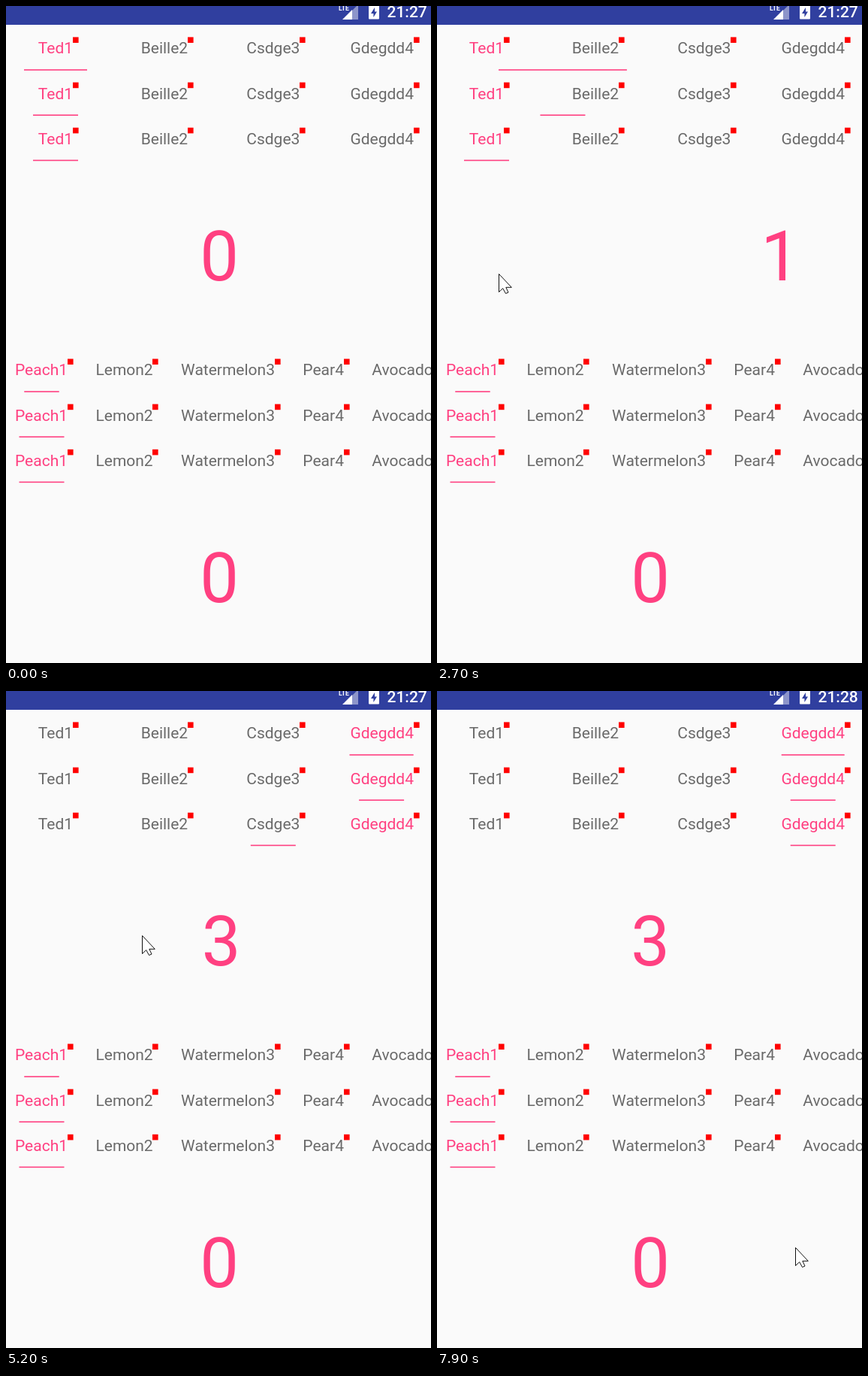
Write an HTML page that moves like this. It is 566 px wide and 874 px high and loops after 8 s.

```html
<!DOCTYPE html>
<html lang="en">
<head>
<meta charset="utf-8">
<title>Sliding tabs</title>
<style>
  html, body { margin: 0; width: 100%; height: 100%; overflow: hidden; background: #fafafa; }
  svg { display: block; width: 566px; height: 874px; font-family: Roboto, sans-serif; }
  .tab { font-size: 21px; fill: #6a6a6a; }
  .tab.on { fill: #ff4081; }
  .line, .digit { fill: #ff4081; }
  .digit { font-size: 92px; text-anchor: middle; }
  .badge { fill: #f00; }
</style>
</head>
<body>
<svg viewBox="0 0 566 874">
  <rect width="566" height="874" fill="#fafafa"/>
  <rect width="566" height="25" fill="#303f9f"/>
  <g fill="#fff">
    <text x="443" y="5.6" font-size="8.5" font-weight="700">LTE</text>
    <path d="M461 6L469 -2V18H461Z" opacity=".45"/>
    <path d="M448 18L461 5V18Z"/>
    <rect x="483" y="-2" width="14" height="19.5" rx="1"/>
    <path d="M491 2L486 10H489.4V15L494 7.6H491Z" fill="#303f9f"/>
    <text id="clock" x="507.5" y="15.3" font-size="21" font-weight="500"></text>
  </g>
  <g id="tabs"></g>
  <g id="pages"></g>
  <path id="cursor" d="M.5 .5V24.5L5.7 19.6L9.5 26.5L13 25L9.8 18.3H17.3Z"
        fill="#fff" stroke="#111" stroke-width="1"/>
</svg>
<script>
const LOOP = 8000, STEP = 100;
const PAGE_GAP = 577, TAB_GAP = 144.9, ROW_GAP = 60.2, LOWER = 428;
const FIRST_TAB = 66, LOWER_PAD = 37.4, MIDDLE = 284.2;

// A move is a steady drag (down to up, over a part of a page) or a tap (up only),
// and then settles on its page.
const moves = [
  { to: 1, down: 1342, up: 2750, drag: .726, settle: 300 },
  { to: 2, down: 3800, up: 4350, drag: .525, settle: 300 },
  { to: 3, down: 4800, up: 4945, drag: .15, settle: 390 },
  { to: 1, up: 6089, settle: 300 },
  { to: 3, up: 6895, settle: 300 }
];

// Pointer stops: arrival time, x, y, rest
const stops = [
  [100, 474, 168], [700, 527, 305, 200], [1342, 493, 320], [2700, 82, 356],
  [3000, 60, 392], [3700, 390, 392], [4300, 98, 344], [4800, 270, 330],
  [5000, 181, 325, 300], [5900, 206, 66, 300], [6500, 502, 63, 600],
  [7700, 423, 677], [7900, 477, 740]
];

const $ = id => document.getElementById(id);
const clamp = v => Math.min(1, Math.max(0, v));
const mix = (a, b, k) => a + (b - a) * k;

function add(parent, name, attrs, text) {
  const el = document.createElementNS("http://www.w3.org/2000/svg", name);
  for (const k in attrs) el.setAttribute(k, attrs[k]);
  if (text) el.textContent = text;
  return parent.appendChild(el);
}

function pagerAt(t) {
  let page = 0, selected = 0, idle = 0;
  for (const { to, down, up, drag = 0, settle } of moves) {
    if (t < (down ?? up)) break;
    if (drag) page += drag * clamp((t - down) / (up - down));
    if (t < up) break;
    selected = to;
    page = mix(to, page, (1 - clamp((t - up) / settle)) ** 5);
    if (Math.abs(page - to) < .001) page = idle = to;
  }
  return { page, selected, idle };
}

function pointerAt(t) {
  let [leave, x, y] = stops[0];
  for (const [time, nx, ny, rest = 0] of stops.slice(1)) {
    const k = clamp((t - leave) / (time - leave));
    x = mix(x, nx, k);
    y = mix(y, ny, k);
    if (t < time) break;
    leave = time + rest;
  }
  return [Math.round(x), Math.round(y)];
}

// A label with a badge at its upper right; x is its middle if centred.
function tab(name, x, y, centred) {
  const el = add($("tabs"), "text", { class: "tab", y: y + 63.4 }, name);
  const width = el.getComputedTextLength();
  const left = centred ? x - width / 2 : x;
  el.setAttribute("x", left);
  add($("tabs"), "rect",
    { class: "badge", x: Math.round(left + width - .4), y: y + 41.4, width: 7.6, height: 7.6 });
  return { el, left, right: left + width };
}

function line(x, y, width) {
  return add($("tabs"), "rect", { class: "line", x, y: y + 84.2, width, height: 1.6 });
}

function digit(text, x, y) {
  add($("pages"), "text", { class: "digit", x, y }, text);
}

const labels = [], lines = [];
for (let row = 0; row < 3; row++) {
  const y = row * ROW_GAP;
  labels.push(["Ted1", "Beille2", "Csdge3", "Gdegdd4"].map(
    (name, i) => tab(name, FIRST_TAB + i * TAB_GAP, y, true).el));
  lines.push(line(0, y, 60));

  let x = 12;
  for (const name of ["Peach1", "Lemon2", "Watermelon3", "Pear4", "Avocado5"]) {
    const { el, right } = tab(name, x, y + LOWER);
    el.classList.toggle("on", x === 12);
    x = right + LOWER_PAD;
  }
  const width = row ? 60 : 46.5;
  line(47.5 - width / 2, y + LOWER, width);
}

for (let i = 0; i < 4; i++) digit(String(i), MIDDLE + i * PAGE_GAP, 365.3);
const still = add(document.querySelector("svg"), "text",
  { class: "digit", x: MIDDLE, y: 365.3 + LOWER }, "0");
$("cursor").before(still);

function render(t) {
  const { page, selected, idle } = pagerAt(t);
  const base = Math.floor(page), part = page - base;

  // The first line stretches: its right end leads, its left end follows.
  const tabX = n => FIRST_TAB + TAB_GAP * n;
  const left = tabX(base + clamp(2 * part - 1)) - 42;
  const right = tabX(base + clamp(2 * part)) + 42;
  lines[0].setAttribute("x", left);
  lines[0].setAttribute("width", right - left);
  lines[1].setAttribute("x", tabX(page) - 30);
  lines[2].setAttribute("x", tabX(idle) - 30);

  for (const row of labels)
    row.forEach((el, i) => el.classList.toggle("on", i === selected));
  $("pages").setAttribute("transform", `translate(${-page * PAGE_GAP} 0)`);
  $("clock").textContent = t < 7300 ? "21:27" : "21:28";

  $("cursor").setAttribute("transform", `translate(${pointerAt(t)})`);
  $("cursor").setAttribute("visibility", t < 100 ? "hidden" : "visible");
}

const start = performance.now();
function tick() {
  const t = (performance.now() - start) % LOOP;
  render(Math.floor(t / STEP) * STEP);
  requestAnimationFrame(tick);
}
tick();
</script>
</body>
</html>
```
